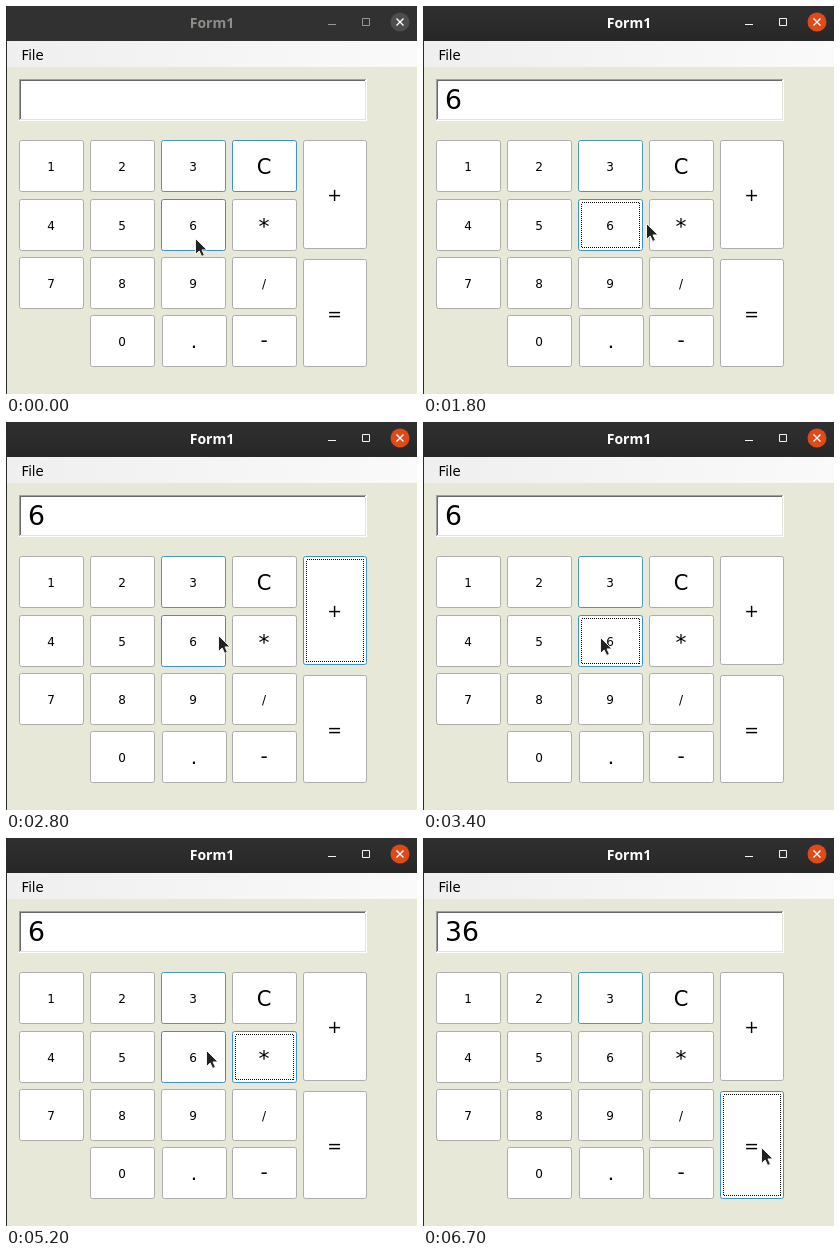
An HTML page that plays this animation: 411 px wide and 388 px high, repeating every 8000 ms.

```html
<!DOCTYPE html>
<html lang="en">
<head>
<meta charset="utf-8">
<title>Calculator</title>
<style>
html, body { margin: 0; height: 100%; overflow: hidden; background: #e8e8d8; }
svg { display: block; width: 411px; height: 388px; }
text { font-family: "DejaVu Sans", sans-serif; }
.title { font: bold 14px "Noto Sans", sans-serif; fill: #8f8d8a; text-anchor: middle; }
.icon { fill: none; stroke: #9a9896; }
.active .title { fill: #fff; }
.active .icon { stroke: #f4f4f4; }
#bar, #close { fill: #313131; }
#close { fill: #4d4d4d; }
.active #bar { fill: url(#dark); }
.active #close { fill: #e04a18; }
.key text { text-anchor: middle; }
.face { fill: #fff; stroke: #adadad; }
.last .face { stroke: #4a9ab0; }
.hover .face, .focus .face { stroke: #3c91cc; }
.down .face { fill: #2579ff; stroke: #2a72d8; }
.dots { display: none; fill: none; stroke: #000; stroke-dasharray: 1 1; shape-rendering: crispEdges; }
.active .focus .dots { display: block; }
</style>
</head>
<body>
<svg id="stage" viewBox="0 0 411 388">
  <defs>
    <linearGradient id="dark" x2="0" y2="1"><stop stop-color="#303030"/><stop offset="1" stop-color="#272727"/></linearGradient>
    <linearGradient id="menu"><stop stop-color="#efefef"/><stop offset="1" stop-color="#fafafa"/></linearGradient>
  </defs>
  <rect width="411" height="388" fill="#e8e8d8"/>
  <rect id="bar" width="411" height="35"/>
  <rect y="35" width="411" height="26" fill="url(#menu)"/>
  <rect width="1" height="388" fill="#2b2b2b"/>
  <text class="title" x="206" y="22">Form1</text>
  <path class="icon" d="M322 18.5h8M356.5 12.5h7v7h-7z"/>
  <circle id="close" cx="394" cy="16" r="9.5"/>
  <path d="M390.5 12.5l7 7m0-7l-7 7" stroke="#fff" stroke-width="1.4"/>
  <text x="15.5" y="54" font-size="13.3">File</text>
  <rect x="13" y="73" width="348" height="42" fill="#fff"/>
  <g fill="none" shape-rendering="crispEdges">
    <path d="M14.5 113.5h345v-39" stroke="#e3e3dc"/>
    <path d="M13.5 114V73.5H360" stroke="#a0a0a0"/>
    <path d="M14.5 113V74.5H359" stroke="#696969"/>
  </g>
  <text id="display" x="22" y="103" font-size="26.7"></text>
  <g id="keys"></g>
  <path id="cursor" d="M.5.5V16.4L4.2 13 6.7 18.4 9.4 17.2 7 11.9H12z" fill="#222" stroke="#fff" stroke-width=".9"/>
</svg>
<script>
const $ = id => document.getElementById(id);
const keys = {};

function addKey(label, x, y, w = 65, h = 52, size = 12, baseline = y + 31) {
  const g = document.createElementNS("http://www.w3.org/2000/svg", "g");
  g.innerHTML = `<rect class="face" x="${x + .5}" y="${y + .5}" width="${w - 1}" height="${h - 1}" rx="2"/>
    <rect class="dots" x="${x + 3.5}" y="${y + 3.5}" width="${w - 7}" height="${h - 7}"/>
    <text x="${x + w / 2 - .5}" y="${baseline}" font-size="${size}">${label}</text>`;
  $("keys").append(g);
  keys[label] = { g, x, y, w, h };
}

["123", "456", "789"].forEach((row, r) =>
  [...row].forEach((n, c) => addKey(n, 13 + 71 * c, [134, 193, 251][r])));
addKey("0", 84, 309);
addKey(".", 156, 309, 65, 52, 20, 342);
addKey("C", 226, 134, 65, 52, 21, 168);
addKey("*", 226, 193, 65, 52, 22, 228);
addKey("/", 226, 251);
addKey("-", 226, 309, 65, 52, 20, 341);
addKey("+", 297, 134, 64, 109, 17.5, 195);
addKey("=", 297, 253, 64, 108, 17.5, 314);

// Each track holds [start ms, value...]; values switch without easing.
const pointer = [
  [0, 189, 232], [900, 187, 232], [1300, 186, 228],
  [1800, 223, 217], [1900, 305, 191], [2000, 341, 181],
  [2600, 318, 190], [2700, 268, 204], [2800, 212, 213], [2900, 177, 215],
  [3700, 195, 215], [3800, 234, 216], [3900, 252, 217],
  [5100, 223, 215], [5200, 200, 212],
  [6000, 275, 254], [6100, 300, 275], [6200, 328, 300], [6300, 338, 309]
];
const focus = [[0, "C"], [1300, "6"], [2200, "+"], [3200, "6"], [4600, "*"], [5500, "6"], [6700, "="]];
const presses = [[1300, 1400], [2200, 2400], [3200, 3400], [4600, 4700], [5500, 5700]];
const display = [[0, ""], [1400, "6"], [6700, "36"]];
const at = (track, t) => track.findLast(step => step[0] <= t);

function draw(now) {
  const t = now % 8000;
  const [, px, py] = at(pointer, t);
  const focused = at(focus, t)[1];
  const down = presses.some(([a, b]) => t >= a && t < b);
  $("stage").classList.toggle("active", t >= 1300);
  $("display").textContent = at(display, t)[1];
  $("cursor").setAttribute("transform", `translate(${px} ${py})`);
  for (const [label, { g, x, y, w, h }] of Object.entries(keys)) {
    const hover = px >= x && px < x + w && py >= y && py < y + h;
    g.setAttribute("class", ["key", label === "3" && "last", hover && "hover",
      label === focused && (down ? "focus down" : "focus")].filter(Boolean).join(" "));
  }
  requestAnimationFrame(draw);
}
requestAnimationFrame(draw);
</script>
</body>
</html>
```
